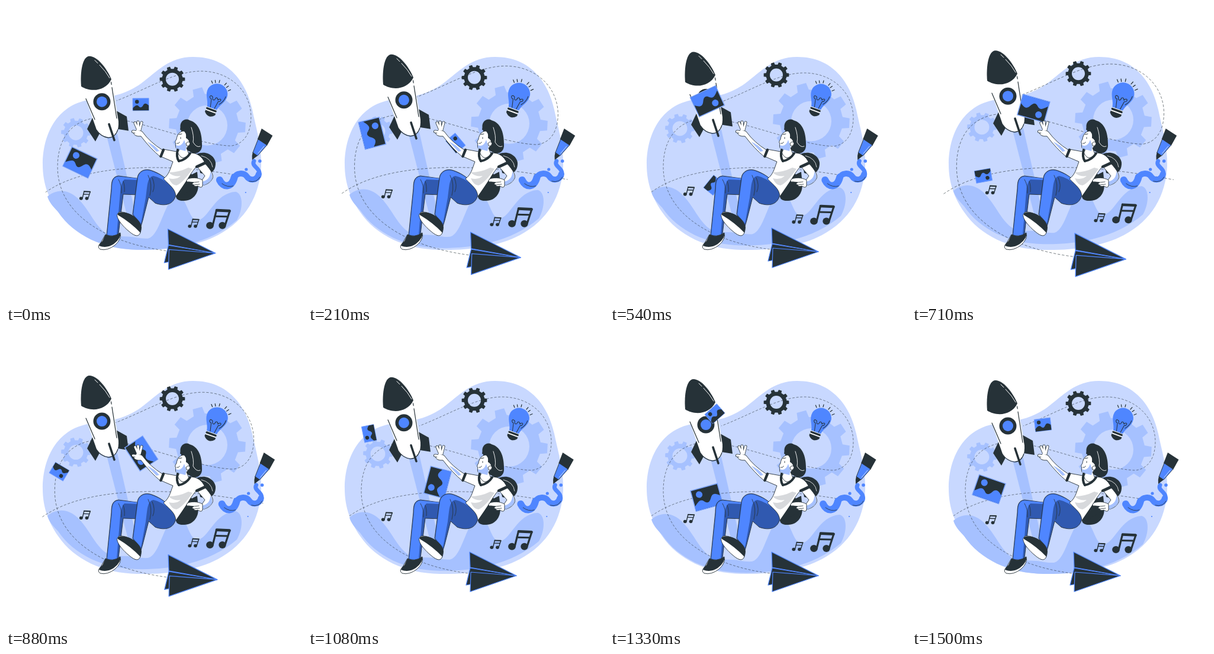
An HTML page that plays this animation: 500x500 px, repeating every 1540 ms.

```html
<!DOCTYPE html>
<html lang="en">
<head>
<meta charset="utf-8">
<title>Creative ideas</title>
<style>
  html, body { margin: 0; width: 100%; height: 100%; overflow: hidden; background: #fff; }
  svg { display: block; width: 100vw; height: 100vh; }
  .pale { fill: #c8d8ff; }
  .soft { fill: #a6c1ff; }
  .blue { fill: #4f86ff; }
  .navy { fill: #3059b0; }
  .dark { fill: #263238; }
  .white { fill: #fff; }
  .line { fill: none; stroke: #263238; stroke-linecap: round; stroke-linejoin: round; }
  .shine { fill: none; stroke: #fff; stroke-linecap: round; }
  .ink { stroke: #263238; stroke-width: .9; stroke-linejoin: round; }
  .dash { fill: none; stroke: #263238; stroke-width: .8; stroke-dasharray: 4 2.6; opacity: .7; }
  .gear { fill-rule: evenodd; }
</style>
</head>
<body>
<svg viewBox="0 0 500 500">
  <defs>
    <g id="note">
      <ellipse class="dark" cx="-14.500" cy="14" rx="6.400" ry="6"/>
      <ellipse class="dark" cx="6.500" cy="14" rx="6.200" ry="6"/>
      <path class="line" stroke-width="3.200" d="M-9.600 13L-3.500-11.500M11.300 13L19-10.500"/>
      <path class="line" stroke-width="4.600" d="M-3-11.500L18.500-10.500"/>
      <path class="line" stroke-width="3" d="M-6-1.500L15-1"/>
    </g>
    <path id="frame" d="M-23.500-18h47v36h-47z"/>
    <path id="hills" d="M-23 17.500V10C-16 4-12-1-6 5C-1 11 3 9 7 2C11-4 15-4 23 3V17.500Z"/>
    <path id="hand" d="M224 213L214.500 212M223 209L218 197.500M224 208L223 196M226 209L229 197"/>
  </defs>

  <path class="pale" d="M62 268C62 212 90 164 145 158C185 153 205 147 228 131C255 111 275 86 316 86C377 86 406 130 416 175C422 205 432 235 431 270C429 320 405 362 358 387C320 407 270 413 222 412C165 411 115 388 88 348C72 325 62 300 62 268Z"/>

  <g class="float">
    <path class="soft" d="M70 322C84 310 104 308 122 326C148 352 155 390 190 390C215 388 222 394 240 393C262 388 268 322 290 322C306 322 308 362 323 362C342 362 352 316 388 314C402 318 400 345 390 362C340 405 270 413 222 412C165 411 115 388 88 348C78 338 72 330 70 322Z"/>
    <path class="soft" d="M170 220L188 216L222 366L209 372Z"/>
    <path class="soft gear" data-gear="340 202 65 34 3"/>
    <path class="soft gear" data-gear="118 214.500 25 12.500 3"/>
    <path class="dark gear" data-gear="281 124 21.500 11 0"/>
    <use href="#note" transform="translate(359 357)"/>
    <use href="#note" transform="translate(317 366) scale(.46)"/>
    <use href="#note" transform="translate(133.500 319) scale(.46)"/>
  </g>

  <g class="beat" data-origin="251 277">
    <path class="dash" d="M270 411C170 398 90 350 90 272C90 220 118 192 160 190C215 188 320 236 378 237C400 234 411 215 411 188C410 145 375 113 328 113C285 113 240 142 188 162"/>
    <path class="dash" d="M70 314C110 286 170 273 250 273C320 273 380 284 426 292"/>
    <g class="dark" stroke="#4f86ff" stroke-width="1.200" stroke-linejoin="round">
      <path d="M274 402L352 415L267 431Z"/>
      <path d="M273 375L352 415L274 401Z"/>
      <path d="M275 409L352 415L274 442Z"/>
    </g>
  </g>

  <g class="float">
    <path class="dark" d="M146 189L137 208L151 229L160 212ZM186 177L204 187L207 211L188 208Z"/>
    <path class="white" d="M127 135L178 124L190 195Q191 216 179 222Q163 222 154 212Z"/>
    <path class="line" stroke-width="1.200" d="M153 210Q160 221 173 223Q185 222 189 209M135 157L150 192M177.500 129L178.200 133M179 138L187 190"/>
    <path class="dark" d="M127 136C125 112 129 85 141 85C154 85 170 105 178 124C168 145 142 146 127 136Z"/>
    <path class="shine" d="M150 92L155 97M158 100Q169 111 175 122"/>
    <circle class="dark" cx="162" cy="162" r="14.500"/>
    <circle class="blue" cx="162" cy="162" r="9"/>
    <path class="line" stroke-width="3.600" d="M174 200L183 227"/>
  </g>

  <g id="pictures" stroke="#7da5ff" stroke-width="1.500">
    <g transform="translate(130 269) rotate(19)">
      <use href="#frame" class="dark"/>
      <g stroke="none" class="blue"><use href="#hills"/><circle cx="-11" cy="-8" r="5.600"/></g>
    </g>
    <g transform="translate(221 160) rotate(-7) scale(.58)">
      <use href="#frame" class="blue"/>
      <g stroke="none" class="dark"><use href="#hills"/><circle cx="-11" cy="-8" r="5.600"/></g>
    </g>
  </g>

  <g class="beat" data-origin="357 157">
    <g transform="translate(356.500 149) rotate(20)">
      <path class="blue" d="M-17-4A17.500 17.500 0 0 1 17-4C19 8 10 14 8.500 25H-8.500C-10 14-19 8-17-4Z"/>
      <path class="line" d="M-3 24L-6 11C-12 10-10 3-5 7C-4 13 0 12 0 7C4 3 5 12 5 8C9 3 12 9 6 11L4 24M15-1Q15 8 9 15"/>
      <path class="white" d="M-8.500 25h17v8h-17z"/>
      <path class="line" stroke-width="3.400" d="M-7.500 27.500H7.500"/>
      <path class="dark" d="M-9 31H9V34Q5 39 0 39Q-5 39-9 34Z"/>
    </g>
    <path class="line" stroke-width="1.200" d="M349 131L347.400 127M354 130L353.400 126M360 130L361 126M369 134L372 130.700M372 138L375.400 135.600M375 143.500L379 141.700"/>
  </g>

  <g id="paint">
    <g fill="none" stroke="#4f86ff" stroke-linecap="round" stroke-linejoin="round">
      <path stroke-width="7" d="M419 262C414 272 431 272 428 287"/>
      <path stroke-width="10" d="M427 284C424 296 411 295 407 288C402 281 389 281 385 291"/>
      <path stroke-width="12" d="M386 289C381 308 367 307 361 294"/>
    </g>
    <path class="line" stroke-width=".8" d="M365 300Q374 307 384 304M411 296Q424 299 429 289"/>
    <circle class="blue" cx="406" cy="276" r="2.600"/>
    <circle class="blue" cx="429" cy="262" r="2.800"/>
    <circle class="blue" cx="405" cy="315" r="1.100"/>
    <path class="dark" d="M432 207L450.500 219L441 236L425 225Z"/>
    <path class="blue ink" d="M426 225L441 235L425 253L417 248Z"/>
    <path class="dark" d="M417 247L425 253Q421 256 416 260Q415 253 417 247Z"/>
    <path class="shine" stroke-width=".7" d="M436 237L426 249"/>
  </g>

  <g id="woman">
    <path class="dark" d="M322 250C340 242 356 256 354 268C353 282 342 286 328 282ZM324 296C328 314 317 329 301 329C288 330 283 323 290 310L308 278Z"/>
    <path class="shine" stroke-width=".8" d="M330 253Q347 257 349 272"/>
    <path class="white ink" d="M264 243Q244 231 230 212Q222 206 215 213Q216 221 228 220Q244 241 261 255Z"/>
    <use href="#hand" class="line" stroke-width="5"/>
    <use href="#hand" class="shine" stroke-width="3.400"/>
    <path class="white" d="M229 213L227 218L218 215L221 208Z"/>
    <path class="soft" d="M238 229Q252 235 259 245L254 246Z"/>

    <path class="navy ink" d="M275 298L228 292L190 287C180 288 178 296 178 308L170 387C178 391 187 389 190 385L198 318L248 320Z"/>
    <path class="blue" d="M226 291.500L190 288C181 289 179 297 179 308L171 386C177 389 183 388 187 386L193 314Q194 298 200 293L226 294Z"/>
    <path class="line" stroke-width=".8" d="M190 293Q196 303 195 316M198 296Q201 304 200 314"/>
    <path class="navy ink" d="M222 290C224 278 236 274 246 278C264 284 282 298 287 318C284 336 268 339 252 333L241 323L231 362L228 372L214 352Z"/>
    <path class="blue" d="M223 290C225 279 236 275 246 279C262 285 276 294 282 306Q264 290 249 287C238 289 239 304 236 324L228 367L215 352Z"/>
    <path class="line" stroke-width=".8" d="M240 286Q248 301 243 320M247 290Q253 303 248 314"/>

    <path class="white ink" d="M168 386Q180 392 193 383Q196 393 184 404Q171 414 159 411Q153 407 160 400Z"/>
    <path class="dark" d="M168 386Q180 392 193 383Q195 392 182 402Q170 410 157 405Q158 401 163 397Z"/>
    <path class="white ink" d="M191 348C201 347 213 353 220 359C229 367 230 377 226 385C222 391 215 387 207 380C196 371 186 358 188 352Z"/>
    <path class="dark" d="M189 350C203 344 226 357 229 374L227 383Q211 366 189 353Z"/>

    <path class="white ink" d="M288 246L266 242L261 254L282 263C277 276 276 284 266 292C278 304 286 309 287 322C301 306 308 287 320 273L336 265C331 254 323 248 311 248Z"/>
    <path fill="#d7d9dc" d="M275 281Q292 281 308 273L315 275Q299 299 288 303Q280 303 275 291Q288 294 295 287Q282 289 275 281Z"/>
    <path class="dark" d="M287 321L311 286L323 280L325 302L302 318Z"/>
    <path class="line" stroke-width="4.500" stroke-linecap="butt" d="M266 243L261.500 254M322 271.500L336 265"/>

    <path class="white ink" d="M324 273L337 267C346 277 351 285 349 291C345 299 338 302 331 303L329 297L336 287Z"/>
    <path class="soft" d="M345 279Q351 288 347 294Q341 301 332 303L331 297Q346 293 345 279Z"/>
    <path class="white ink" d="M332 294C323 289 313 290 307 292Q302 298 309 297L317 298Q312 301 317 302Q318 306 324 304Q331 309 332 303Z"/>
    <path class="line" stroke-width=".8" d="M317 298L326 297M318 302L327 301"/>

    <path class="dark" d="M295 207C292 196 302 188 310 193C325 197 331 213 331 233C332 243 326 250 316 249L303 242Z"/>
    <path class="white ink" d="M301 211C292 212 289 218 288 225Q284 231 287 232C285 240 288 243 294 241L290 247Q297 264 309 250L305 240L312 232L307 218Z"/>
    <path class="soft" d="M287 235Q297 239 301 226L305 238L303 245Q296 243 291 242Q286 242 287 235Z"/>
    <path class="dark" d="M294 209C295 196 306 190 316 198L314 233L309 236Q311 226 304 223Q305 214 300 211Z"/>
    <path class="white ink" d="M304 232Q309 227 311 232Q309 238 305 236Z"/>
    <path class="line" stroke-width="1" d="M295 222v2M292 217L297 216M289 232Q292 233 293 230"/>
    <path class="line" stroke-width="4" stroke-linecap="butt" d="M290 243Q287 255 292 262Q304 260 311 249"/>
    <path class="shine" stroke-width=".9" d="M313 205Q318 220 316 230Q322 240 328 237"/>
  </g>
</svg>
<script>
const LOOP = 1540, CYCLE = 1500, LEAD = 27;
const all = selector => [...document.querySelectorAll(selector)];
const setTransform = (el, value) => el.setAttribute('transform', value);

function gearPath(cx, cy, r, hole, turn, teeth = 10) {
  const root = r * .82, points = [];
  for (let i = 0; i < teeth; i++) {
    for (const [offset, radius] of [[-.29, root], [-.2, r], [.2, r], [.29, root]]) {
      const a = turn * Math.PI / 180 + (i + offset) * 2 * Math.PI / teeth;
      points.push(`${cx + radius * Math.cos(a)} ${cy + radius * Math.sin(a)}`);
    }
  }
  const arc = `a${hole} ${hole} 0 0 1`;
  return `M${points.join('L')}ZM${cx - hole} ${cy}${arc} ${2 * hole} 0${arc} ${-2 * hole} 0Z`;
}
for (const el of all('.gear')) {
  el.setAttribute('d', gearPath(...el.dataset.gear.split(' ').map(Number)));
}

// Linear interpolation over [position, value] keys.
function track(keys, x) {
  const i = Math.max(1, keys.findIndex(key => key[0] >= x));
  const [x0, v0] = keys[i - 1], [x1, v1] = keys[i];
  return v0 + (v1 - v0) * (x - x0) / (x1 - x0);
}
const BOB = [[0, 0], [.5, -10], [1, 0]];
const BEAT = [[0, 1], [.1, 1.1], [.3, 1], [.4, 1], [.5, 1.1], [.7, 1], [1, 1]];
const SHAKE = [0, -1, 2, -4, 4, -4, 4, -4, 2, -1, 0].map((v, i) => [i / 10, v]);

const floats = all('.float'), beats = all('.beat');
const pictures = document.getElementById('pictures');
const paint = document.getElementById('paint');

function draw(time) {
  const p = Math.min(time % LOOP + LEAD, CYCLE) / CYCLE;
  const y = track(BOB, p), scale = track(BEAT, p);
  for (const el of floats) setTransform(el, `translate(0 ${y})`);
  for (const el of beats) {
    const [ox, oy] = el.dataset.origin.split(' ');
    setTransform(el, `translate(${ox} ${oy}) scale(${scale}) translate(-${ox} -${oy})`);
  }
  setTransform(pictures, `rotate(${360 * p} 169 222)`);
  setTransform(paint, `translate(${track(SHAKE, p)} 0)`);
}

let start;
function tick(now) {
  start ??= now;
  draw(now - start);
  requestAnimationFrame(tick);
}
draw(0);
requestAnimationFrame(tick);
</script>
</body>
</html>
```
